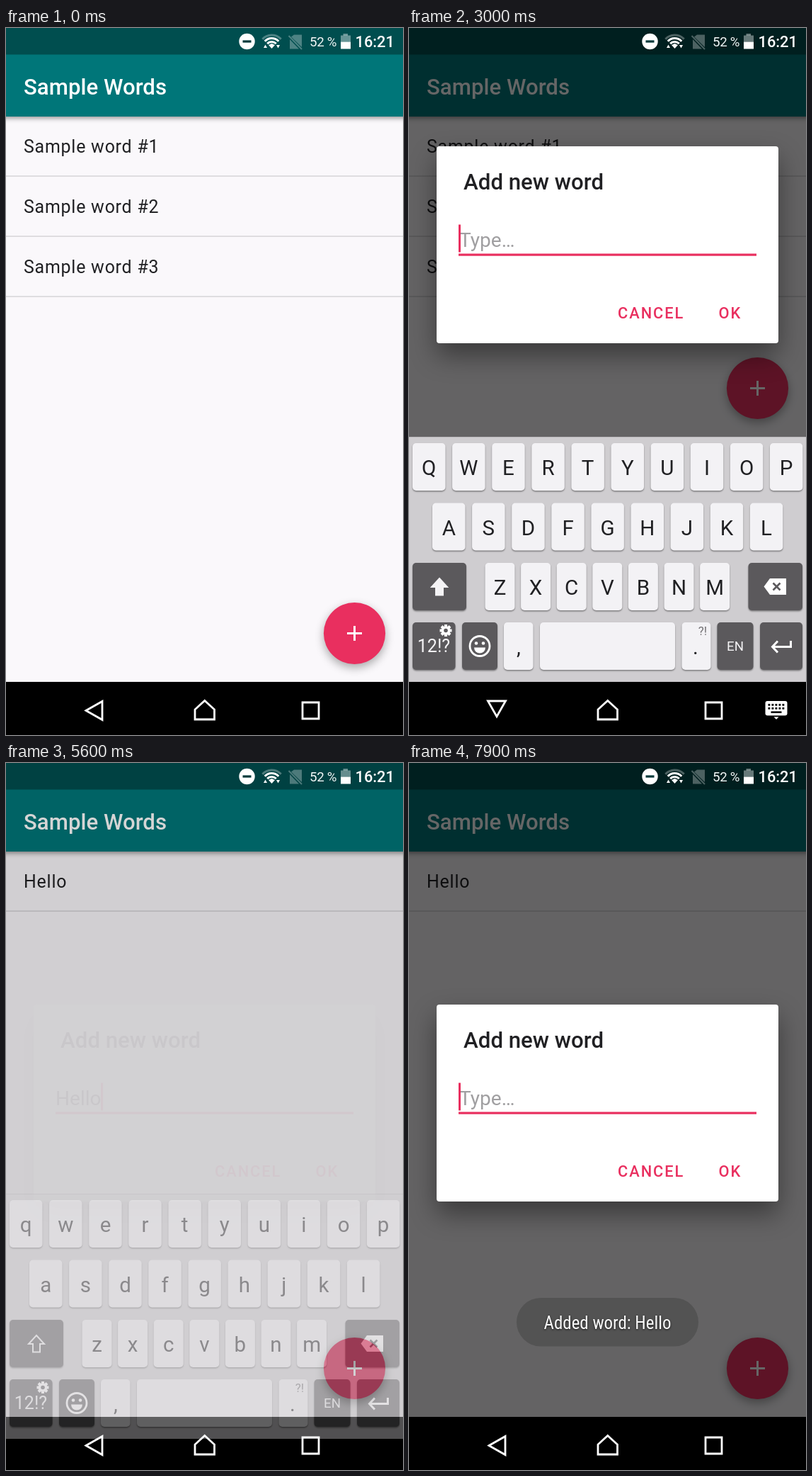
Recreate the animation shown at these times as an HTML page with a canvas. Size 561 by 998 pixels, loop 8000 ms.

```html
<!DOCTYPE html>
<html lang="en">
<head>
<meta charset="utf-8">
<title>Word list</title>
<style>
html, body { margin: 0; width: 100%; height: 100%; overflow: hidden; background: #000; }
canvas { display: block; }
</style>
</head>
<body>
<canvas id="stage" width="561" height="998"></canvas>
<script>
const W = 561, H = 998, LOOP = 8000, STEP = 100;
const PINK = '#e92f5f', INK = '#202023', PAPER = '#faf8fb';
const KEY = '#f3f2f5', DARK = '#5b595c', BOARD = '#cfcdd0';
const KB_TOP = 577, KB_H = 346;

const main = document.getElementById('stage').getContext('2d');
const layer = Object.assign(document.createElement('canvas'), { width: W, height: H }).getContext('2d');
let c = main;

const ramp = (t, from, dur) => Math.min(1, Math.max(0, (t - from) / dur));
const easeOut = p => 1 - (1 - p) ** 2;
const within = (t, a, b) => t >= a && t < b;

function rect(x, y, w, h, fill) {
  c.fillStyle = fill;
  c.fillRect(x, y, w, h);
}

function rounded(x, y, w, h, r, fill) {
  c.fillStyle = fill;
  c.beginPath();
  c.roundRect(x, y, w, h, r);
  c.fill();
}

function disc(x, y, r, fill) {
  c.fillStyle = fill;
  c.beginPath();
  c.arc(x, y, r, 0, Math.PI * 2);
  c.fill();
}

function poly(points, { fill, stroke, width = 3, open = false }) {
  c.beginPath();
  points.forEach(([x, y]) => c.lineTo(x, y));
  if (!open) c.closePath();
  if (fill) { c.fillStyle = fill; c.fill(); }
  if (stroke) {
    c.strokeStyle = stroke;
    c.lineWidth = width;
    c.stroke();
  }
}

function text(str, x, y, size, fill, { weight = 400, spacing = 0, align = 'left', family = 'Roboto' } = {}) {
  c.font = `${weight} ${size}px ${family}, sans-serif`;
  c.letterSpacing = spacing + 'px';
  c.textAlign = align;
  c.fillStyle = fill;
  c.fillText(str, x, y);
}

function shadow(color, blur, dy, draw) {
  c.save();
  c.shadowColor = color;
  c.shadowBlur = blur;
  c.shadowOffsetY = dy;
  draw();
  c.restore();
}

// Draws several shapes as one translucent picture.
function group(alpha, draw) {
  if (alpha <= 0) return;
  if (alpha >= 1) return draw();
  layer.clearRect(0, 0, W, H);
  c = layer;
  draw();
  c = main;
  c.save();
  c.globalAlpha = alpha;
  c.drawImage(layer.canvas, 0, 0);
  c.restore();
}

// Typing: key, press time, release time
const taps = [
  ['h', 3300, 3400], ['e', 3700, 3800], ['l', 4200, 4300], ['l', 4400, 4500], ['o', 4700, 4800]
];

function typedText(t) {
  const s = taps.filter(k => t >= k[2]).map(k => k[0]).join('');
  return s && s[0].toUpperCase() + s.slice(1);
}

function cursorOn(t) {
  return !(within(t, 1600, 2100) || within(t, 2500, 3000) || within(t, 5300, 5500));
}

function stateAt(t) {
  const second = t >= 7000;
  const opened = ramp(t, second ? 7450 : 650, 250);
  const closing = within(t, 5500, 7000);
  return {
    words: t < 5600 ? [1, 2, 3].map(n => 'Sample word #' + n) : ['Hello'],
    pressed: within(t, 500, 800) || within(t, 7400, 7600),
    dim: closing ? 0.6 * (1 - ramp(t, 5500, 138)) : 0.6 * opened,
    dialog: closing ? 1 - ramp(t, 5500, 104) : easeOut(opened),
    zoom: closing ? 1 : 0.9 + 0.1 * easeOut(opened),
    dialogY: within(t, 1800, 5600) ? 341 - 174 * easeOut(ramp(t, 1800, 437)) : 341,
    resized: within(t, 1900, 5600),
    boardAlpha: t < 5500 ? ramp(t, 1700, 250) : 1 - ramp(t, 5500, 165),
    boardShift: t < 5500 ? 35 * (1 - easeOut(ramp(t, 1700, 250))) : 31 * ramp(t, 5500, 100) ** 2,
    imeNav: within(t, 1800, 5600),
    caps: within(t, 2900, 3500),
    toast: ramp(t, 5600, 400),
    typed: second ? '' : typedText(t),
    cursor: cursorOn(t),
    okPressed: within(t, 5500, 5600)
  };
}

function drawApp(s) {
  rect(0, 0, W, H, PAPER);
  shadow('rgba(0,0,0,.45)', 7, 2, () => rect(-10, 37, W + 20, 88, '#007679'));
  rect(0, 0, W, 37.5, '#004e4f');
  text('Sample Words', 25, 94, 31.2, '#fff', { weight: 500 });
  s.words.forEach((word, i) => {
    text(word, 25, 176 + 85 * i, 24.93, INK, { spacing: 0.78 });
    rect(0, 208.3 + 85 * i, W, 1.5, '#d6d5d8');
  });
  const y = s.resized ? 508.5 : 854.5;
  shadow('rgba(0,0,0,.33)', s.pressed ? 20 : 13, s.pressed ? 9 : 5,
    () => disc(492.5, y, 43.6, s.pressed ? '#eb3b67' : PINK));
  rect(482, y - 1.5, 21, 3, '#fff');
  rect(491, y - 10.5, 3, 21, '#fff');
}

function drawDialog(s) {
  const y = s.dialogY;
  c.save();
  c.translate(W / 2, y + 139);
  c.scale(s.zoom, s.zoom);
  c.translate(-W / 2, -139);
  shadow('rgba(0,0,0,.42)', 36, 17, () => rounded(39, 0, 483, 278, 4, '#fff'));
  text('Add new word', 77, 61, 31.2, INK, { weight: 500 });
  if (s.typed) text(s.typed, 70, 141.5, 28.05, INK);
  else text('Type…', 71, 141.5, 28.05, '#a09fa1');
  rect(70, 151.5, 421, 3.2, PINK);
  if (s.cursor) {
    c.font = '400 28.05px Roboto, sans-serif';
    c.letterSpacing = '0px';
    rect(70 + (s.typed ? c.measureText(s.typed).width - 0.5 : 0), 110.5, 3, 39, PINK);
  }
  if (s.okPressed) rounded(413, 208, 82, 56, 4, 'rgba(233,47,95,.16)');
  const label = { weight: 500, spacing: 1.95 };
  text('CANCEL', 295, 243, 21.8, PINK, label);
  text('OK', 437.5, 243, 21.8, PINK, label);
  c.restore();
}

const rows = [
  { keys: 'qwertyuiop', x: 5, y: 586, pitch: 56.1, w: 46.5 },
  { keys: 'asdfghjkl', x: 33, y: 670.5, pitch: 56.1, w: 46.5 },
  { keys: 'zxcvbnm', x: 107.5, y: 755, pitch: 50.6, w: 42 }
];

function drawKey(x, y, w, fill) {
  shadow('rgba(0,0,0,.4)', 2, 1.5, () => rounded(x, y, w, 67, 5, fill));
}

function drawKeyIcons(caps) {
  const white = '#f4f3f5';
  poly([[43, 777], [54, 789], [48, 789], [48, 800.5], [38, 800.5], [38, 789], [32, 789]],
    { stroke: white, width: 2, fill: caps ? white : null });

  poly([[501.5, 788.5], [510, 777], [533, 777], [533, 800], [510, 800]], { fill: '#fff' });
  poly([[514.5, 783.5], [524.5, 793.5]], { stroke: DARK, open: true, width: 2.6 });
  poly([[524.5, 783.5], [514.5, 793.5]], { stroke: DARK, open: true, width: 2.6 });

  text('12!?', 35, 881, 25, white, { align: 'center' });
  for (let i = 0; i < 8; i++) {
    c.save();
    c.translate(52, 850.5);
    c.rotate(i * Math.PI / 4);
    rect(-2, -8.5, 4, 5, '#fff');
    c.restore();
  }
  disc(52, 850.5, 6.3, '#fff');
  disc(52, 850.5, 2.8, DARK);

  c.strokeStyle = '#fff';
  c.lineWidth = 2.8;
  c.beginPath();
  c.arc(100, 872.5, 14, 0, Math.PI * 2);
  c.stroke();
  disc(95, 868.5, 2.3, '#fff');
  disc(105, 868.5, 2.3, '#fff');
  c.fillStyle = '#fff';
  c.beginPath();
  c.arc(100, 874.5, 8, 0, Math.PI);
  c.fill();

  text('EN', 461, 879, 18.7, white, { align: 'center' });
  poly([[539.5, 865], [539.5, 873.5], [515, 873.5]], { stroke: '#fff', open: true });
  poly([[521, 865.5], [513.5, 873.5], [521, 881.5]], { stroke: '#fff', open: true });
}

function drawBoard(s, t) {
  c.save();
  c.translate(0, s.boardShift);
  rect(0, KB_TOP, W, KB_H, BOARD);
  rect(0, KB_TOP, W, 1, '#b9b7ba');
  const tap = taps.find(k => within(t, k[1], k[2] + STEP) && !taps.some(n => n !== k && t === n[1]));
  let popup = null;
  for (const row of rows) {
    [...row.keys].forEach((key, i) => {
      const x = row.x + i * row.pitch, mid = x + row.w / 2;
      const down = tap && tap[0] === key;
      const label = s.caps ? key.toUpperCase() : key;
      drawKey(x, row.y, row.w, down && t < tap[2] ? '#d9d8db' : KEY);
      text(label, mid, row.y + 45, 29.5, INK, { align: 'center' });
      if (down && t < tap[2]) popup = { mid, y: row.y, label };
    });
  }
  drawKey(5, 755, 76, within(t, 2800, 2900) ? '#79777a' : DARK);
  drawKey(479.5, 755, 76.5, DARK);
  drawKey(5, 839, 60.5, DARK);
  drawKey(75, 839, 50, DARK);
  drawKey(134, 839, 41.5, KEY);
  drawKey(185, 839, 191, KEY);
  drawKey(385.5, 839, 41, KEY);
  drawKey(435.5, 839, 51, DARK);
  drawKey(496, 839, 60, DARK);
  text(',', 155, 884, 29.5, INK, { align: 'center' });
  text('.', 405, 884, 29.5, INK, { align: 'center' });
  text('?!', 415, 857, 17, '#737174', { align: 'center' });
  drawKeyIcons(s.caps);
  if (popup) {
    shadow('rgba(0,0,0,.4)', 6, 2, () => rounded(popup.mid - 38, popup.y - 88, 76, 82, 5, KEY));
    text(popup.label, popup.mid, popup.y - 34, 42, INK, { align: 'center' });
  }
  c.restore();
}

function drawToast() {
  rounded(152, 755, 257, 68.5, 34.25, 'rgba(82,82,82,.9)');
  shadow('rgba(0,0,0,.7)', 3, 1, () =>
    text('Added word: Hello', 280.5, 798.5, 24.93, '#fafafa',
      { align: 'center', family: '"Roboto Condensed", Roboto' }));
}

function drawStatus() {
  const faint = 'rgba(255,255,255,.3)';
  disc(340.5, 19, 11.2, '#fff');
  rect(334.5, 17.4, 12, 3.2, '#00393a');

  const arc = (r, w, color) => {
    c.strokeStyle = color;
    c.lineWidth = w;
    c.beginPath();
    c.arc(375.5, 28, r, -Math.PI * 0.76, -Math.PI * 0.24);
    c.stroke();
  };
  arc(18, 3, faint);
  arc(13.4, 3, '#fff');
  arc(8.6, 3, '#fff');
  poly([[375.5, 29], [371, 24], [375.5, 22], [380, 24]], { fill: '#fff' });
  poly([[364, 28], [366.5, 23.5], [369, 28]], { fill: '#fff' });
  poly([[382, 24], [387, 24], [384.5, 28.5]], { fill: '#fff' });

  poly([[407, 9.5], [418, 9.5], [418, 27], [403, 12.5]], { fill: faint });
  poly([[401, 16], [414, 29.5], [401, 29.5]], { fill: faint });
  poly([[399.5, 11], [418, 30]], { stroke: faint, width: 2, open: true });

  text('52 %', 429, 26, 18.7, '#f2f6f6', { spacing: -0.3 });
  rect(476.5, 8, 6.5, 3, 'rgba(255,255,255,.4)');
  rect(473, 10.5, 14, 9, 'rgba(255,255,255,.4)');
  rect(473, 19.5, 14, 10, '#fff');
  text('16:21', 493.5, 27, 21.8, '#fff', { weight: 500 });
}

function drawNav(ime) {
  const line = { stroke: '#fff', width: 2.8 };
  poly(ime ? [[111.5, 950], [136.5, 950], [124, 972]] : [[113, 963.5], [136, 950.5], [136, 976.5]], line);
  poly([[280.8, 949.5], [294.5, 962], [294.5, 976], [267, 976], [267, 962]], line);
  poly([[419, 952], [442, 952], [442, 975], [419, 975]], line);
  if (!ime) return;
  rounded(503.5, 950, 31, 20.5, 3, '#fff');
  for (let i = 0; i < 5; i++) {
    rect(507.5 + i * 5, 954, 2.8, 2.8, '#000');
    rect(507.5 + i * 5, 959, 2.8, 2.8, '#000');
  }
  rect(511.5, 964.5, 15, 2.6, '#000');
  poly([[515.5, 972.5], [522.5, 972.5], [519, 976]], { fill: '#fff' });
}

function draw(t) {
  const s = stateAt(t);
  drawApp(s);
  rect(0, 0, W, H, `rgba(0,0,0,${s.dim})`);
  group(s.dialog, () => drawDialog(s));
  rect(0, 923, W, 75, '#000');
  group(s.boardAlpha, () => drawBoard(s, t));
  group(s.toast, drawToast);
  drawStatus();
  drawNav(s.imeNav);
}

function tick() {
  draw(Math.floor(performance.now() % LOOP / STEP) * STEP);
  requestAnimationFrame(tick);
}
tick();
</script>
</body>
</html>
```
